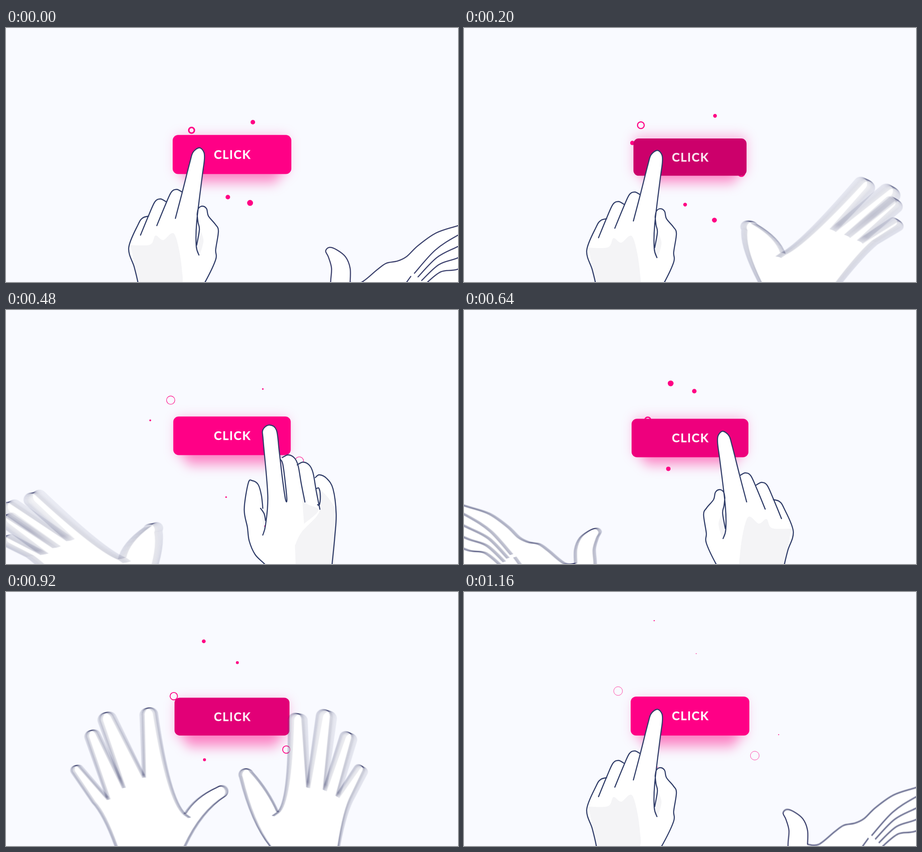
These frames come from a looping animation (998 by 561 pixels, 1.2 s). An HTML page with a canvas:

```html
<!DOCTYPE html>
<html lang="en">
<head>
<meta charset="utf-8">
<title>Click</title>
<style>
  html, body { margin: 0; width: 100%; height: 100%; overflow: hidden; background: #f9faff; }
  svg, canvas { position: absolute; left: 0; top: 0; width: 998px; height: 561px; display: block; }
  text { font: 700 26px Lato, sans-serif; letter-spacing: 1.8px; fill: #fff; stroke: #fff; stroke-width: .4px; }
</style>
</head>
<body>
<svg viewBox="0 0 998 561">
  <defs>
    <filter id="soft" x="-30%" y="-80%" width="160%" height="260%" color-interpolation-filters="sRGB">
      <feGaussianBlur stdDeviation="13"/>
    </filter>
  </defs>
  <g fill="#ff0084" filter="url(#soft)">
    <rect x="374" y="237" width="250" height="88" rx="12" opacity=".26"/>
    <rect x="396" y="290" width="206" height="54" rx="12" opacity=".36"/>
  </g>
  <g id="bits"></g>
  <rect id="btn"/>
  <text id="label" x="459">CLICK</text>
</svg>
<canvas id="hands" width="998" height="561"></canvas>
<script>
const W = 998, H = 561, HALF = 520, LOOP = 1200, BEAT = 600, STEP = 40;
const INK = '#2f3c68', SHADE = '#f4f4f6', PINK = '#ff0084';
const SHUTTER = 20, SAMPLES = 15;
const $ = id => document.getElementById(id);
const set = (el, attrs) => { for (const k in attrs) el.setAttribute(k, attrs[k]); };
const mix = (a, b, k) => [a[0] + (b[0] - a[0]) * k, a[1] + (b[1] - a[1]) * k];
const shift = (a, dx, dy) => a.map((v, i) => v + (i % 2 ? dy : dx));
const clamp = v => Math.min(1, Math.max(0, v));
const hump = (s, from, to) => Math.sin(Math.PI * clamp((s - from) / (to - from)));

// Button: pushed down on the beat, then a light rebound
function buttonY(t) {
  const s = (t + STEP) % BEAT - STEP;
  return 274 + 12.3 * Math.pow(hump(s, -40, 325), .75) + 4 * hump(s, 420, 560);
}

function drawButton(t) {
  const s = t % BEAT, y = buttonY(t);
  const press = end => Math.min(clamp(s / 120), clamp((end - s) / (end - 200)));
  const w = 262 - 12.3 * press(560), h = w * .329, dark = press(480), red = 255 - 51 * dark;
  set($('btn'), {
    x: 499 - w / 2, y: y - h / 2, width: w, height: h, rx: w * .046,
    fill: `rgb(${red},0,${red * .525})`
  });
  set($('label'), { y: y + 9.4, opacity: 1 - .1 * dark });
}

// Particles: velocity in px/s, head start in s, radius (0 = ring).
// Each beat reflects the previous burst through the centre.
const burst = [
  [46, -70, 1, 5], [-8, 83, 1.15, 5], [70, 190, .57, 6.5],
  [-190, -36, .47, 5.8], [-96, -56, .93, 0], [126, 47, .7, 0]
].map(([vx, vy, lead, r]) => {
  const el = document.createElementNS('http://www.w3.org/2000/svg', 'circle');
  set(el, r ? { fill: PINK } : { fill: 'none', stroke: PINK });
  return { vx, vy, lead, r, el: $('bits').appendChild(el) };
});

function drawBits(t) {
  const s = t % BEAT, sign = t < BEAT ? 1 : -1;
  for (const b of burst) {
    const d = sign * (b.lead + s / 1000);
    set(b.el, {
      cx: 499 + b.vx * d, cy: 278 + b.vy * d,
      r: b.r ? b.r * (1 - Math.pow(s / 640, 1.5)) : 6.2 + s * .0062,
      'stroke-width': 3.3 * (1 - s / 720)
    });
  }
}

// Monotone cubic through rows of [time, ...values]
function curve(rows) {
  const rate = (i, c) => (rows[i + 1][c] - rows[i][c]) / (rows[i + 1][0] - rows[i][0]);
  const slope = (i, c) => {
    if (i === 0 || i === rows.length - 1) return 0;
    const a = rate(i - 1, c), b = rate(i, c);
    return a * b <= 0 ? 0 : 2 * a * b / (a + b);
  };
  return t => {
    let i = 0;
    while (i < rows.length - 2 && t >= rows[i + 1][0]) i++;
    const h = rows[i + 1][0] - rows[i][0];
    const u = clamp((t - rows[i][0]) / h), v = 1 - u;
    return rows[i].slice(1).map((p, k) => {
      const c = k + 1;
      return p * v * v * (1 + 2 * u) + rows[i + 1][c] * u * u * (3 - 2 * u)
        + h * u * v * (v * slope(i, c) - u * slope(i + 1, c));
    });
  };
}

// Open hand joints around the thumb web: wrist, side, tips and gaps, web, thumb, heel, wrist
const wide = [-152,70, -202,-26, -245,-106, -169,-33, -209,-185, -135,-59, -178,-224,
  -90,-82, -82,-235, 0,0, 90,-58, 40,4, 0,70];
const flat = [-138,76, -162,-49, -179,-115, -128,-45, -145,-187, -99,-57, -91,-233,
  -62,-60, -28,-221, 0,0, 82,-90, 52,15, 11,76];

// Time, flatness, web x, web y, turn in degrees, finger fan
const swing = curve([
  [250, 1, 410, 485, 0, 1], [320, 1, 398, 487, 4, 1], [400, 0, 343, 505, 11.5, 1],
  [480, 0, 256, 550, 13.4, .52], [540, 0, 213, 555, 13.4, .52], [600, 0, 210, 562, 13.4, .52],
  [720, 0, 256, 546, 13.4, .52], [800, 0, 293, 498, 8, .52], [920, 0, 395, 491, 0, 1],
  [1000, 1, 410, 485, 0, 1], [1040, 1, 410, 485, 0, 1]
]);

function joints(t) {
  const [k, x, y, turn, fan] = swing(t);
  const pts = [];
  for (let i = 0; i < 13; i++) pts.push(mix(wide.slice(2 * i, 2 * i + 2), flat.slice(2 * i, 2 * i + 2), k));
  const angle = p => Math.atan2(-p[0], -p[1]), pinky = angle(pts[2]);
  return pts.map((p, i) => {
    const len = Math.hypot(...p), finger = i > 0 && i < 9, wrist = i === 0 || i > 10;
    const a = (finger ? pinky + (angle(p) - pinky) * fan : angle(p)) + turn * Math.PI / 180;
    return [x - len * Math.sin(a) + (wrist ? 80 * (1 - fan) : 0), y - len * Math.cos(a)];
  });
}

// Drawn poses: strokes that bound the fill, extra lines, shaded areas
const knuckle = [0,0, 19,-46, 32,-74, 44,-80, 56,-74];
const point = {
  edge: [
    [300,610, 291,561, 283,528, 271,486, 292,434, 302,420, 315,416],
    shift(knuckle, 297, 458),
    shift(knuckle, 333, 437),
    [374,421, 389,364, 406,297, 413,275, 427,265, 437,275, 438,292, 433,330, 421,430, 420,482, 426,502],
    [422,412, 425,399, 434,394, 443,400, 447,416, 462,434, 469,449, 463,490, 463,512, 440,561, 415,600]
  ],
  lines: [[422,412, 424,430, 427,446, 421,480]],
  shade: [
    [275,480, 318,479, 330,459, 347,469, 372,456, 388,530, 380,575, 294,575],
    [428,446, 436,470, 427,500, 422,480]
  ]
};
const bentKnuckle = [0,0, 8,-40, 15,-80, 23,-97, 37,-104, 50,-98];
const bend = {
  edge: [
    [282,600, 278,561, 272,500, 269,450, 276,395, 290,372, 306,364, 315,370],
    shift(bentKnuckle, 305, 440),
    shift(bentKnuckle, 338, 424),
    [392,330, 386,345, 378,415, 381,418, 388,370, 395,310, 401,265, 417,254, 431,265, 430,290, 420,410, 425,475, 431,497],
    [431,438, 434,410, 441,386, 454,377, 463,382, 472,440, 465,480, 461,510, 448,540, 427,561, 400,590]
  ],
  lines: [[436,438, 428,450, 425,465], [312,394, 307,394, 304,410, 306,430, 310,430]],
  shade: [
    [360,520, 345,490, 306,445, 309,395, 271,440, 272,500, 280,575, 358,575],
    [346,390, 337,425, 308,442, 340,472],
    [434,440, 428,455, 429,490]
  ]
};
const fingerLine = k => [-60,428 + 26 * k, 0,457 + 25 * k, 50 - 4 * k,490 + 16 * k, 96 - 8 * k,541 + 8 * k];
const rest = {
  edge: [
    [281,610, 281,561, 279,530, 286,505, 292,492, 284,484, 268,489, 248,505, 238,530, 238,561],
    [238,561, 213,561, 178,533, 158,519, 133,514, 113,504, 88,480, 48,452, 0,436, -60,418]
  ],
  tail: [-60, 620],
  lines: [[117,566, 104,548], ...[0, 1, 2, 3].map(fingerLine)],
  shade: [[73,514, 0,484, -60,460, -60,540, 70,560, 98,545]]
};

// Smooth curve through a flat list of points
function spline(path, a, join) {
  const n = a.length / 2;
  const at = i => { const k = 2 * Math.max(0, Math.min(n - 1, i)); return [a[k], a[k + 1]]; };
  path[join ? 'lineTo' : 'moveTo'](a[0], a[1]);
  for (let i = 0; i < n - 1; i++) {
    const [p, q, r, s] = [at(i - 1), at(i), at(i + 1), at(i + 2)];
    path.bezierCurveTo(q[0] + (r[0] - p[0]) / 6, q[1] + (r[1] - p[1]) / 6,
      r[0] - (s[0] - q[0]) / 6, r[1] - (s[1] - q[1]) / 6, r[0], r[1]);
  }
}

for (const pose of [point, bend, rest]) {
  pose.body = new Path2D(); pose.ink = new Path2D(); pose.tone = new Path2D();
  pose.edge.forEach((a, i) => spline(pose.body, a, i > 0));
  if (pose.tail) pose.body.lineTo(...pose.tail);
  [...pose.edge, ...pose.lines].forEach(a => spline(pose.ink, a));
  pose.shade.forEach(a => spline(pose.tone, a));
}

function paint(g, { body, tone, ink }) {
  g.fillStyle = '#fff'; g.fill(body);
  g.fillStyle = SHADE; g.fill(tone);
  g.strokeStyle = INK; g.lineWidth = 2.4; g.lineCap = g.lineJoin = 'round';
  g.stroke(ink);
}

// Round fingertip between the gaps a and b
function tip(path, a, end, b, r) {
  const m = mix(a, b, .5), ang = Math.atan2(end[1] - m[1], end[0] - m[0]);
  const c = [end[0] - Math.cos(ang) * r, end[1] - Math.sin(ang) * r];
  const side = k => [c[0] + r * Math.cos(ang + k * Math.PI / 2), c[1] + r * Math.sin(ang + k * Math.PI / 2)];
  return { near: side(-1), far: side(1), cap: () => path.arc(c[0], c[1], r, ang - Math.PI / 2, ang + Math.PI / 2) };
}

function openHand(p) {
  const [wristL, side, , gap1, , gap2, , gap3, index, web, thumb, heel, wristR] = p;
  const body = new Path2D(), tone = new Path2D();
  const bow = mix(mix(side, wristL, .4), gap1, .3);
  body.moveTo(wristL[0] + 10, wristL[1] + 90);
  body.lineTo(...wristL);
  body.quadraticCurveTo(...bow, ...side);
  [10, 13, 15.5, 15].forEach((r, i) => {
    const b = p[2 * i + 3];
    tip(body, p[2 * i + 1], p[2 * i + 2], b, r).cap();
    if (i < 3) body.lineTo(...b);
    else body.quadraticCurveTo(...mix(web, gap3, .4), ...web);
  });
  const f = tip(body, web, thumb, heel, 13);
  body.quadraticCurveTo(...mix(mix(web, thumb, .35), index, .08), ...f.near);
  f.cap();
  const half = mix(f.far, wristR, .5);
  body.quadraticCurveTo(2 * heel[0] - half[0], 2 * heel[1] - half[1], ...wristR);
  body.lineTo(wristR[0] - 30, wristR[1] + 90);

  const mid = mix(wristL, wristR, .37);
  tone.moveTo(...wristL);
  tone.quadraticCurveTo(...bow, ...mix(side, gap1, .4));
  [mix(gap1, wristL, .15), mix(gap2, mid, .2), mid, [mid[0] + 5, mid[1] + 60], [wristL[0] + 8, wristL[1] + 60]]
    .forEach(q => tone.lineTo(...q));

  const ink = new Path2D(body);
  ink.moveTo(...web);
  ink.lineTo(web[0] + 10, web[1] + 7);
  return { body, tone, ink };
}

const layer = () => {
  const c = document.createElement('canvas');
  c.width = HALF; c.height = H;
  return c.getContext('2d');
};
const one = layer(), sum = layer(), out = $('hands').getContext('2d');

// Pose is chosen by t, placement by the moment u within the shutter
function sample(t, u) {
  one.setTransform(1, 0, 0, 1, 0, 0);
  one.clearRect(0, 0, HALF, H);
  if (t < 260 || t >= 1100) {
    one.translate(0, buttonY(t) - 280);
    paint(one, point);
  } else if (t < 300 || t >= 1020) {
    paint(one, bend);
  } else {
    const p = joints(u);
    if (t > 500 && t < 690) {
      one.translate(p[10][0] - 284, p[10][1] - 484);
      paint(one, rest);
    } else paint(one, openHand(p));
  }
}

function drawHand(t) {
  const n = t < 300 || t >= 1020 ? 1 : SAMPLES;
  sum.globalCompositeOperation = 'lighter';
  sum.clearRect(0, 0, HALF, H);
  sum.globalAlpha = 1 / n;
  for (let i = 0; i < n; i++) {
    sample(t, t + SHUTTER * ((i + .5) / n - .5));
    sum.drawImage(one.canvas, 0, 0);
  }
  out.drawImage(sum.canvas, 0, 0);
}

function draw(t) {
  drawBits(t);
  drawButton(t);
  out.setTransform(1, 0, 0, 1, 0, 0);
  out.clearRect(0, 0, W, H);
  drawHand(t);
  out.setTransform(-1, 0, 0, 1, W, 0);
  drawHand((t + BEAT) % LOOP);
}

const start = performance.now();
let last = -1;
function tick() {
  const t = Math.floor((performance.now() - start) % LOOP / STEP) * STEP;
  if (t !== last) draw(last = t);
  requestAnimationFrame(tick);
}
tick();
</script>
</body>
</html>
```
